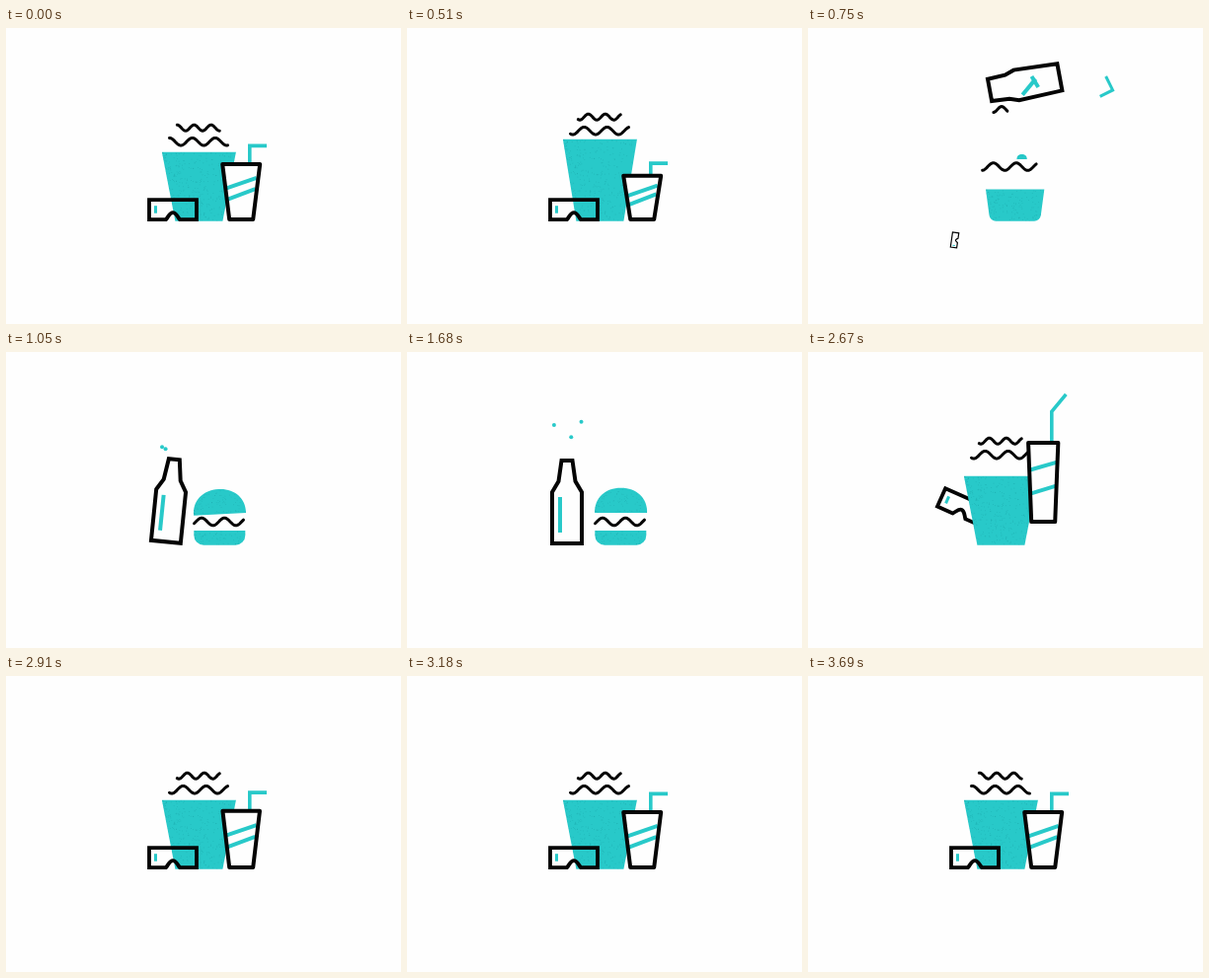
Recreate the animation shown at these times as an HTML page with a canvas. Size 400 by 300 pixels, loop 3720 ms.

```html
<!DOCTYPE html>
<html lang="en">
<head>
<meta charset="utf-8">
<title>Snacks</title>
<style>
html, body { margin: 0; width: 100%; height: 100%; overflow: hidden; background: #fefefe; }
canvas { display: block; width: 400px; height: 300px; }
</style>
</head>
<body>
<canvas id="stage" width="400" height="300"></canvas>
<script>
const LOOP = 3720, TEAL = '#28c9c9', INK = '#050505', PAPER = '#fefefe';
const OUT = 570, BACK = 2190, FLOOR = 194;
const c = document.getElementById('stage').getContext('2d');

const mix = (a, b, k) => a + (b - a) * k;
const ramp = (t, a, b) => Math.min(1, Math.max(0, (t - a) / (b - a)));
const ease = (t, a, b) => { const k = ramp(t, a, b); return k * k * (3 - 2 * k); };
const bump = (t, a, b) => Math.sin(Math.PI * ramp(t, a, b));
const ring = (t, a) => t < a ? 0 : Math.exp((a - t) / 90) * Math.sin((t - a) / 45);
// 0 in the popcorn scene, 1 in the burger scene.
const scene = (t, out, back) => ease(t, OUT, OUT + out) - ease(t, BACK, BACK + back);

const crouch = t => ease(t, 180, 510) * (1 - ease(t, OUT, 700));
const lean = t => ease(t, 1980, 2160) * (1 - ease(t, BACK, 2320));
const air = t => ease(t, 2500, 2640) * (1 - ease(t, 2690, 2760));

function trace(points, close) {
  c.beginPath();
  points.forEach(([x, y]) => c.lineTo(x, y));
  if (close) c.closePath();
}

function ink(color, width, join = 'miter', cap = 'butt') {
  c.strokeStyle = color;
  c.lineWidth = width;
  c.lineJoin = join;
  c.lineCap = cap;
  c.stroke();
}

function placed(x, y, turn, scale, draw) {
  if (scale < .01) return;
  c.save();
  c.translate(x, y);
  c.rotate(turn * Math.PI / 180);
  c.scale(scale, scale);
  draw();
  c.restore();
}

let seed = 7;
const rand = () => (seed = seed * 16807 % 2147483647) / 2147483647;
const grain = Array.from({ length: 420 }, () => [rand() ** 1.8, rand()]);

// Fills the current path and dusts it with fine specks.
function speckle(x, y, w, h) {
  c.fillStyle = TEAL;
  c.fill();
  c.save();
  c.clip();
  c.fillStyle = 'rgba(0,100,110,.18)';
  for (const [u, v] of grain.slice(0, w * h / 12)) c.fillRect(x + u * w, y + v * h, .8, .8);
  c.restore();
}

// Popcorn tub, which shrinks into the lower bun.
function tub(t) {
  const m = scene(t, 290, 260), base = 195.7;
  const x = mix(195.4, 216.3, m), top = mix(125.7, 181, m) - 13 * crouch(t);
  const a = mix(37.5, 26, m), b = mix(24, 26, m);
  c.beginPath();
  c.moveTo(x - a, top);
  c.lineTo(x + a, top);
  c.arcTo(x + b, base, x, base, 10 * m);
  c.arcTo(x - b, base, x - a, top, 10 * m);
  c.closePath();
  speckle(x - a, top, 2 * a, base - top);
}

function bun(t) {
  const wobble = ring(t, 1020);
  const y = 163 - 30 * (1 - ease(t, 780, 1040)) + 3 * wobble + 12 * ease(t, BACK, 2380);
  placed(216.6, y, -7 * wobble, ease(t, 700, 880) - ease(t, BACK, 2380), () => {
    c.beginPath();
    c.moveTo(-26.5, 0);
    c.bezierCurveTo(-27, -15, -16, -25.3, 0, -25.3);
    c.bezierCurveTo(16, -25.3, 27, -15, 26.5, 0);
    c.closePath();
    speckle(-26.5, -25.3, 53, 25.3);
  });
}

function wave(x, y, half, length, amp, phase) {
  if (half < 1) return;
  const points = [];
  for (let d = -half; d <= half; d += .5) {
    points.push([x + d, y - amp * Math.cos((d + half) / length * 2 * Math.PI + phase)]);
  }
  trace(points);
  ink(INK, 3, 'round', 'round');
}

function waves(t) {
  const m = scene(t, 390, 310), toss = 11 * (crouch(t) + air(t));
  const phase = Math.PI * (.8 * ramp(t, 0, 510) + .55 * m + 1.2 * ramp(t, 3180, LOOP));
  const shown = 1 - ease(t, 640, 820) + ease(t, 2350, 2550);
  wave(195, 101.2 - toss - 30 * bump(t, OUT, 800), 21.7 * shown, 17.2, 3, phase);
  wave(mix(195, 215.5, m), mix(115.2, 172, m) - toss, mix(29.5, 25, m), 23.2, 3.8, phase);
}

function cupPose(t) {
  const flip = ease(t, OUT, 1090) - ease(t, BACK, 2560);
  const slide = ease(t, OUT, 1130) - ease(t, BACK, 2640);
  const lift = 110 * bump(t, OUT, 1053) + 57 * bump(t, BACK, 2740) - 110 * bump(t, BACK, 2450);
  return {
    x: mix(238.2, 162, slide),
    base: FLOOR - lift,
    turn: -360 * flip,
    m: scene(t, 330, 310),
    stretch: 1 - .21 * crouch(t) - .14 * lean(t) + .43 * air(t) - .25 * ring(t, 2740)
  };
}

// Half width and height up the right side of the bottle.
const bottle = [[15, 0], [15, 52], [8.5, 63], [5.5, 84]];

function cup({ x, base, turn, m, stretch }) {
  const extra = Math.max(0, stretch - 1), tall = 56 * stretch;
  const mid = mix(56, 84, m) * stretch / 2;
  const half = u => mix(12, 19 - 9 * extra, u);
  const side = bottle.map(([w, h]) => {
    const u = h / 84;
    return [mix(half(u), w, m), mid - mix(tall * u, h * stretch, m)];
  });
  const outline = [...side, ...side.map(([w, y]) => [-w, y]).reverse()];

  placed(x, base - mid, turn, 1, () => {
    trace(outline, true);
    c.fillStyle = PAPER;
    c.fill();
    const tilt = 5.4 / Math.max(1, stretch);
    for (const k of [1, -1]) {
      const u = .555 + k * (.1 + .115 * extra), w = half(u) - 1, y = mid - u * tall;
      if (k > 0) {
        trace([[mix(-w, -7, m), mix(y + tilt, mid - 47 * stretch, m)],
               [mix(w, -7, m), mix(y - tilt, mid - 11 * stretch, m)]]);
      } else {
        trace([[-w * (1 - m), y + tilt * (1 - m)], [w * (1 - m), y - tilt * (1 - m)]]);
      }
      ink(TEAL, 4);
    }
    trace(outline, true);
    ink(INK, 4, m > .5 ? 'miter' : 'round');
  });
}

function straw(t, { base, stretch }) {
  const off = ramp(t, OUT, 900), flick = air(t);
  const leaving = t < BACK;
  const y = (leaving ? FLOOR : base) - 56 * stretch - 90 * bump(t, OUT, 900);
  const scale = leaving ? 1 - off ** 3 : ease(t, 2430, 2600);
  placed(246.8 + (leaving ? 100 * off : 0), y, leaving ? 280 * off : 0, scale, () => {
    const stem = 18.6 - 6 * crouch(t) + 13 * flick;
    trace([[0, 0], [0, -stem], [mix(17.2, 14.5, flick), -stem - 17.5 * flick]]);
    ink(TEAL, 3.6);
  });
}

function specs(t) {
  const gone = ease(t, OUT, 860), back = ease(t, 2500, 2640);
  const peek = bump(t, 2540, 2800), leaving = t < BACK;
  const x = 169 - 12 * peek + (leaving ? -30 * gone : 30 * (1 - back));
  const y = 184.2 - 27 * peek + (leaving ? 45 * gone : 0);
  const turn = 24 * peek - (leaving ? 120 * gone : 0);
  placed(x, y, turn, leaving ? 1 - gone : back, () => {
    c.beginPath();
    c.moveTo(-7, 10);
    c.lineTo(-24, 10);
    c.lineTo(-24, -10);
    c.lineTo(24, -10);
    c.lineTo(24, 10);
    c.lineTo(7, 10);
    c.bezierCurveTo(4, 6, 3, 3, 0, 3);
    c.bezierCurveTo(-3, 3, -4, 6, -7, 10);
    c.closePath();
    ink(INK, 3.8);
    trace([[-17.5, -4], [-17.5, 3.5]]);
    ink(TEAL, 3);
  });
}

function fizz(t) {
  c.fillStyle = TEAL;
  [[148.5, 73], [166.5, 85.5], [177.3, 69]].forEach(([x, y], i) => {
    const k = (t - 1020 - 25 * i) / 1000;
    if (k < 0 || k > 1) return;
    const e = 1 - (1 - k) ** 3;
    c.beginPath();
    c.arc(mix(159 + 2.5 * i, x, e), mix(98.5, y, e), 2 * Math.min(1, (1 - k) * 5), 0, 7);
    c.fill();
  });
}

function draw(t) {
  c.fillStyle = PAPER;
  c.fillRect(0, 0, 400, 300);
  const behind = t > 2400 && t < 2740, pose = cupPose(t);
  if (behind) specs(t);
  tub(t);
  bun(t);
  waves(t);
  straw(t, pose);
  cup(pose);
  if (!behind) specs(t);
  fizz(t);
}

const begin = performance.now();
function tick() {
  draw((performance.now() - begin) % LOOP);
  requestAnimationFrame(tick);
}
tick();
</script>
</body>
</html>
```
